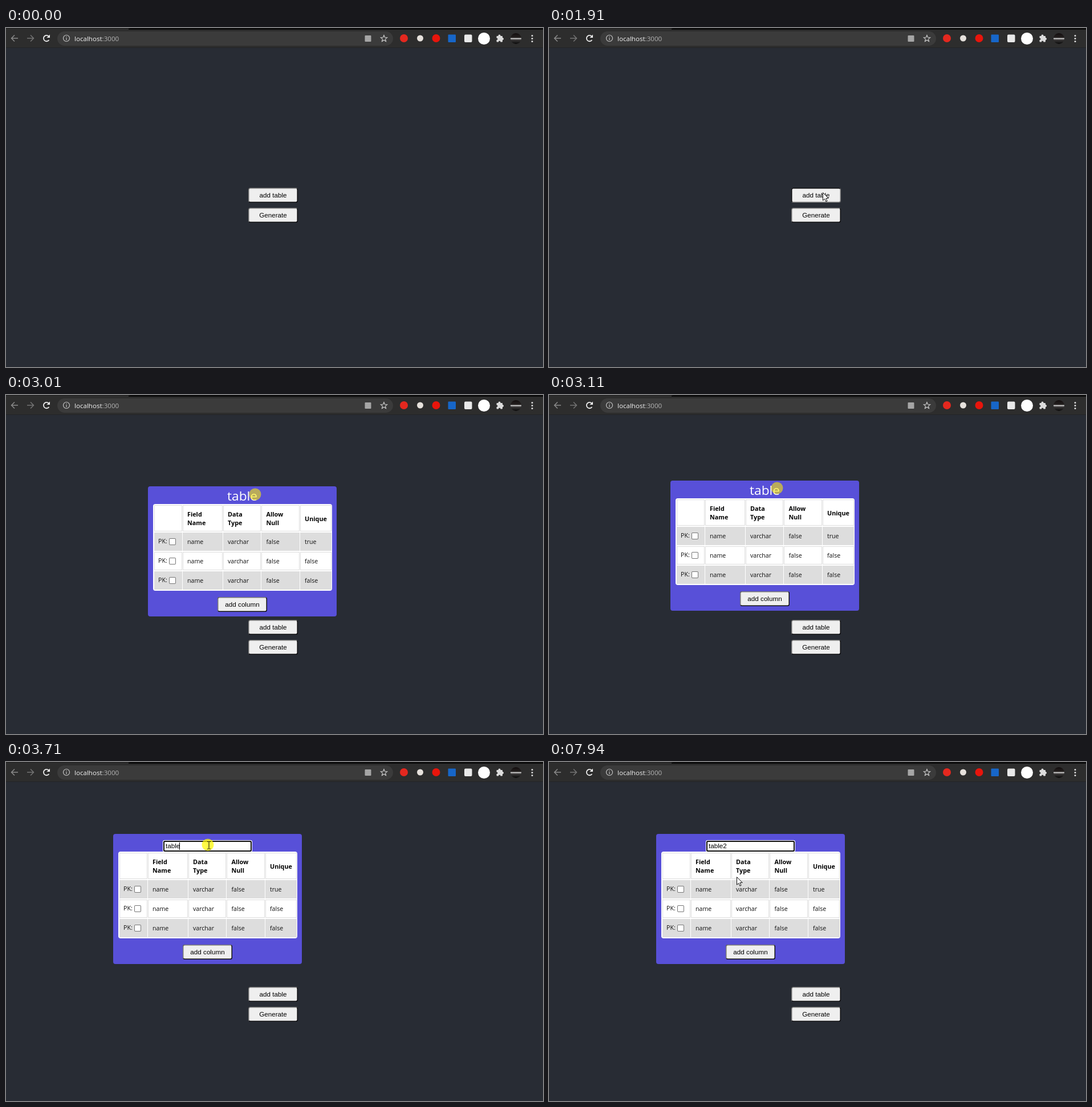
Write an HTML page with a canvas that moves like this. It is 942x594 px and loops after 8000 ms.

```html
<!DOCTYPE html>
<html lang="en">
<head>
<meta charset="utf-8">
<title>Table builder</title>
<style>
html, body { margin: 0; width: 100%; height: 100%; overflow: hidden; background: #282c34; }
canvas { display: block; }
</style>
</head>
<body>
<canvas id="stage" width="942" height="594"></canvas>
<script>
const c = document.getElementById('stage').getContext('2d');
const LOOP = 8000;
const UI = '"Open Sans", "Noto Sans", sans-serif';
const ARIAL = '11.67px "Liberation Sans", Arial, sans-serif';
const CELL = '10.6px ' + UI;

// Screen-recorded positions: [time, x, y, pointer kind]
const pointer = [
  [0, 0, 0, ''],
  [190, 880, 568, 'arrow'], [290, 760, 495, 'arrow'], [390, 686, 456, 'arrow'], [490, 648, 442, 'arrow'],
  [790, 640, 430, 'arrow'], [890, 625, 413, 'arrow'], [990, 598, 378, 'arrow'], [1090, 556, 328, 'arrow'],
  [1200, 528, 306, 'arrow'], [1300, 498, 295, 'arrow'], [1410, 480, 288, 'arrow'],
  [2410, 483, 268, 'arrow'], [2510, 488, 232, 'arrow'], [2610, 491, 199, 'arrow'], [2710, 492, 182, 'beam'],
  [2810, 492, 181, 'drag'], [2910, 482, 179, 'drag'], [3010, 437, 174, 'drag'], [3110, 400, 163, 'drag'],
  [3210, 383, 146, 'drag'], [3310, 375, 139, 'beam'], [3410, 364, 143, 'beam'], [3510, 356, 146, 'beam'],
  [3610, 356, 146, 'click'], [3810, 356, 146, 'beam'],
  [7640, 351, 160, 'arrow'], [7740, 343, 178, 'arrow'], [7840, 334, 193, 'arrow'], [7940, 329, 201, 'arrow']
];
const panelPath = [
  [2010, 303, 166], [2910, 294, 165], [3010, 249, 160], [3110, 213, 150], [3210, 196, 133], [3310, 188, 126]
];
const caretFlips = [3610, 4010, 4520, 5020, 5620, 6120, 6630, 7540];

const latest = (keys, t) => keys.filter(k => k[0] <= t).pop();

function box(x, y, w, h, r, color) {
  c.fillStyle = color;
  c.beginPath();
  c.roundRect(x, y, w, h, r);
  c.fill();
}
function disc(x, y, r, color) {
  c.fillStyle = color;
  c.beginPath();
  c.arc(x, y, r, 0, 7);
  c.fill();
}
function text(s, x, y, font, color = '#111', align = 'left') {
  c.font = font;
  c.fillStyle = color;
  c.textAlign = align;
  c.fillText(s, x, y);
}
function stroke(d, color, width = 1.5) {
  c.strokeStyle = color;
  c.lineWidth = width;
  c.stroke(new Path2D(d));
}

function drawBrowser() {
  box(0, 0, 942, 35, 0, '#2d2d2d');
  box(215, 0, 727, 3, 0, '#0b0b0b');
  box(0, 0, 217, 1, 0, '#1c1c1c');
  box(0, 34, 942, 1, 0, '#222326');
  box(90, 6, 589, 25, 12.5, '#3b3b3b');

  stroke('M21 18H10M15 12.5L9.5 18L15 23.5', '#8b8b8b');
  stroke('M37 18H48M43 12.5L48.5 18L43 23.5', '#747474');
  stroke('M75.4 21A5.2 5.2 0 1 1 74.8 14.4', '#eee', 1.8);
  c.fillStyle = '#eee';
  c.fill(new Path2D('M77 11.5V17H71.5Z'));

  stroke('M111.5 18A5.5 5.5 0 1 1 100.5 18A5.5 5.5 0 1 1 111.5 18M106 17.3V21.2M106 14.7V16', '#c6c6c6', 1.2);
  text('localhost', 120, 22.5, '11.6px ' + UI, '#f2f2f2');
  text(':3000', 120 + c.measureText('localhost').width, 22.5, '11.6px ' + UI, '#b4b4b4');

  box(629.5, 13, 11, 11, 1, '#a5a5a5');
  c.beginPath();
  for (let i = 0; i < 10; i++) {
    const a = i * Math.PI / 5 - Math.PI / 2, r = i % 2 ? 2.6 : 6;
    c.lineTo(663 + r * Math.cos(a), 18.6 + r * Math.sin(a));
  }
  c.closePath();
  c.strokeStyle = '#d0d0d0';
  c.lineWidth = 1.1;
  c.stroke();

  disc(698, 18, 7, '#e4281f');
  disc(726.5, 18, 5.5, '#e6e1dc');
  disc(754.5, 18, 7, '#e8150c');
  box(775.5, 11.5, 13.5, 13.5, 1, '#1766c8');
  box(804, 11.5, 13.5, 13.5, 2, '#e9e9e9');
  disc(838.5, 18.5, 10.5, '#fff');

  box(860.5, 14, 10.5, 10.5, 1, '#dcdcdc');
  disc(865.5, 13.5, 2, '#dcdcdc');
  disc(871, 19, 2, '#dcdcdc');
  disc(860.7, 19.3, 1.7, '#2d2d2d');
  disc(865.7, 24.3, 1.7, '#2d2d2d');

  const glow = c.createLinearGradient(0, 9, 0, 28);
  [[0, '#120d0d'], [.4, '#24201f'], [.5, '#c9c9c9'], [.62, '#3a3838'], [1, '#080808']]
    .forEach(([p, color]) => glow.addColorStop(p, color));
  disc(894.5, 18.5, 9.5, glow);
  for (const y of [13.5, 18.5, 23.5]) disc(923, y, 1.5, '#dedede');
}

function button(label, x, y, pressed = false) {
  const light = '#777', dark = '#0c0c0e';
  box(x, y, 87, 26, 3.5, pressed ? light : dark);
  c.save();
  c.clip(new Path2D(`M${x} ${y}h87l-13 13h-61l-13 13z`));
  box(x, y, 87, 26, 3.5, pressed ? dark : light);
  c.restore();
  box(x + 1.5, y + 1.5, 84, 23, 2, '#efefef');
  text(label, x + 43.5, y + 17, ARIAL, '#000', 'center');
}

function drawTable() {
  const columns = [[11, 49], [61, 70], [132, 66], [199, 67], [267, 55]];
  const textX = [18, 69, 140, 207.5, 275];
  const heads = ['', 'Field Name', 'Data Type', 'Allow Null', 'Unique'];
  const bold = 'bold 10.8px ' + UI;
  box(9, 31, 314, 152, 4, '#fff');
  c.strokeStyle = '#ddd';
  c.lineWidth = 1;
  for (const [x, w] of columns) c.strokeRect(x + .5, 33.5, w - 1, 45);
  heads.forEach((head, i) => {
    const lines = head.split(' ');
    lines.forEach((line, n) => text(line, textX[i], (lines.length > 1 ? 53 : 61) + n * 15, bold, '#000'));
  });
  for (let row = 0; row < 3; row++) {
    const y = 81 + row * 34;
    for (const [x, w] of columns) {
      box(x, y, w, 32, 0, '#ddd');
      if (row === 1) box(x + 1, y + 1, w - 2, 30, 0, '#fff');
    }
    text('PK:', 18, y + 19, CELL);
    box(37, y + 10, 12, 12, 2, '#767676');
    box(38, y + 11, 10, 10, 1, '#fff');
    ['name', 'varchar', 'false', row ? 'false' : 'true']
      .forEach((s, i) => text(s, textX[i + 1], y + 20, CELL));
  }
}

function drawTitleInput(t) {
  box(87, 11, 157, 21, 3, '#fff');
  box(88, 12, 155, 19, 2.5, '#101010');
  box(90, 14, 151, 15, 1, '#fff');
  const typed = t >= 7030;
  text(typed ? 'table2' : 'table', 92, 25, ARIAL, '#000');
  const caretOn = caretFlips.filter(f => f <= t).length % 2 === 1 || (typed && t < 7540);
  if (caretOn) box(typed ? 123 : 116, 15, 1, 13, 0, '#000');
}

function drawPanel(t) {
  const at = latest(panelPath, t);
  if (!at) return;
  c.save();
  c.translate(at[1], at[2]);
  box(0, 0, 331, 228, 4, '#5850d8');
  if (t < 3610) text('table', 165.5, 25, '22.7px ' + UI, '#fff', 'center');
  drawTable();
  if (t >= 3610) drawTitleInput(t);
  button('add column', 122, 194);
  c.restore();
}

function drawPointer(t) {
  const [, x, y, kind] = latest(pointer, t);
  if (kind === 'drag') disc(x, y, 10.5, 'rgba(255,238,0,.58)');
  if (kind === 'click') disc(x - 2, y - 1, 10.5, 'rgba(255,250,0,.72)');
  c.save();
  c.translate(x, y);
  if (kind === 'arrow') {
    const shape = new Path2D('M.5 .5V14.2L3.7 11.3L5.8 16.2L8 15.2L5.9 10.4H10.2Z');
    c.fillStyle = '#fff';
    c.fill(shape);
    c.strokeStyle = '#111';
    c.lineWidth = 1;
    c.stroke(shape);
  } else if (kind === 'beam' || kind === 'click') {
    stroke('M-3 -6.5H-.5M.5 -6.5H3M0 -6V6M-3 6.5H-.5M.5 6.5H3', '#111', 1.1);
  }
  c.restore();
}

function draw(now) {
  const t = now % LOOP;
  box(0, 0, 942, 594, 0, '#282c34');
  drawBrowser();
  const top = t < 2010 ? 280 : 394;
  button('add table', 425, top, t >= 1610 && t < 2010);
  button('Generate', 425, top + 35);
  drawPanel(t);
  drawPointer(t);
  requestAnimationFrame(draw);
}
requestAnimationFrame(draw);
</script>
</body>
</html>
```
